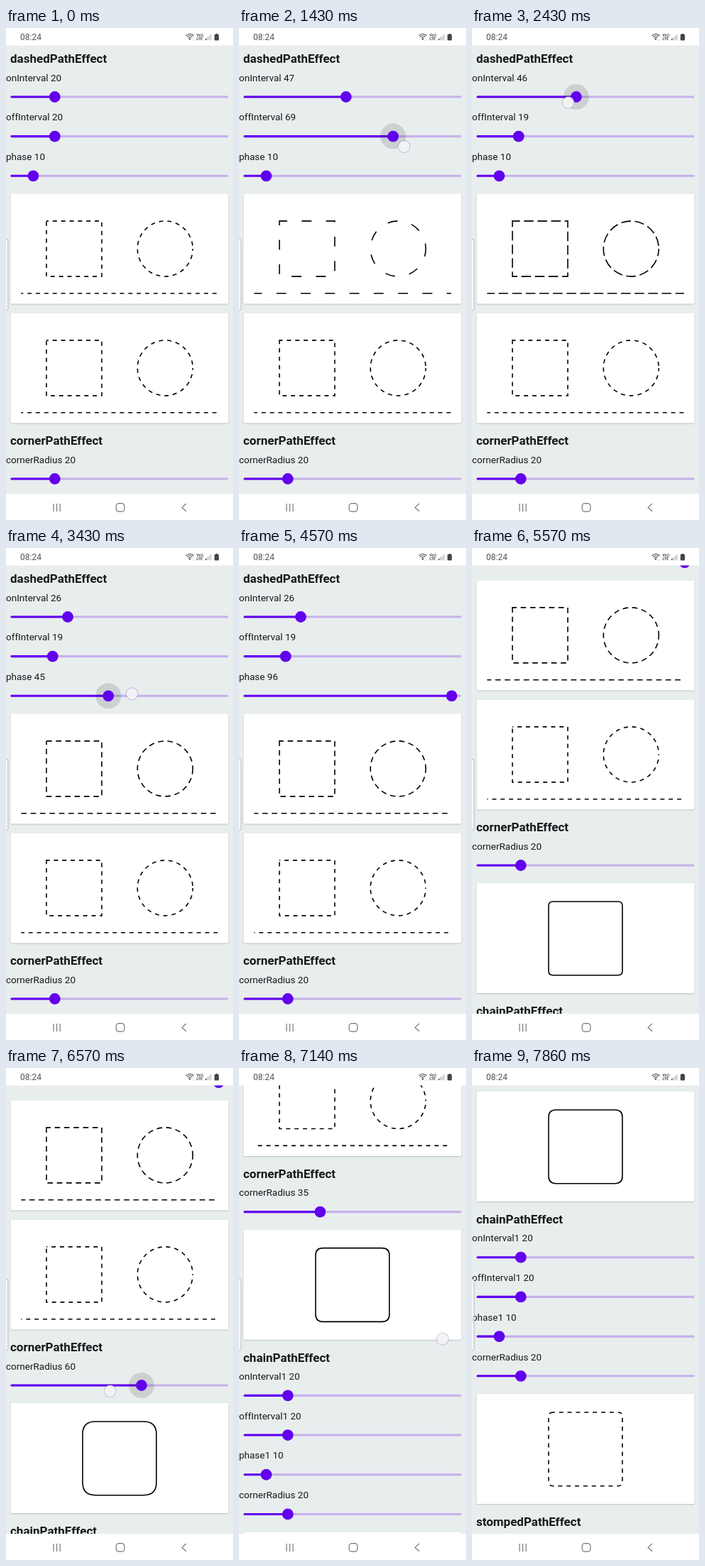
An HTML page with a canvas that plays this animation: 320 px wide and 693 px high, repeating every 8000 ms.

```html
<!DOCTYPE html>
<html lang="en">
<head>
<meta charset="utf-8">
<title>Path effects</title>
<style>
  html, body { margin: 0; width: 100%; height: 100%; overflow: hidden; background: #fff; }
  canvas { display: block; width: 320px; height: 693px; }
</style>
</head>
<body>
<canvas id="stage"></canvas>
<script>
const canvas = document.getElementById('stage');
const ctx = canvas.getContext('2d');
const ratio = window.devicePixelRatio || 1;
canvas.width = 320 * ratio;
canvas.height = 693 * ratio;

const LOOP = 8000, FPS = 7;
const UNIT = 320 / 1080; // device pixels to stage pixels
const INK = '#000', PURPLE = '#6200ee', TRACK = '#c6b1ec', PAGE = '#e8edee';
const POINTER_LEAD = 80;

// Keys are [time, value] pairs, joined by straight lines.
const motion = {
  on: [[280, 20], [860, 47], [2400, 47], [2860, 26]],
  off: [[1140, 20], [1290, 52], [1430, 69], [1510, 74], [1640, 80], [1760, 78], [2200, 19]],
  phase: [[3150, 10], [3430, 45], [3510, 56], [3850, 96]],
  corner: [[5860, 20], [6240, 97], [6380, 95], [6710, 35]],
  scroll: [[4640, 0], [4860, 85], [5000, 135], [5140, 163], [5290, 179], [5430, 186], [5570, 188],
           [6860, 188], [7000, 305], [7143, 432.5], [7290, 525], [7430, 580], [7570, 610], [7710, 623], [7857, 627]],
};
const drags = [
  { name: 'on', from: 270, to: 930, dy: 8 },
  { name: 'off', from: 1130, to: 2270, dy: 14.5 },
  { name: 'on', from: 2400, to: 2900, dy: 8 },
  { name: 'phase', from: 3140, to: 4050, dy: -3 },
  { name: 'corner', from: 5840, to: 6760, dy: 8 },
];
const swipes = [
  { from: 4640, to: 5010, x: 280, y: 520, start: 0 },
  { from: 6860, to: 7200, x: 287, y: 626, start: 188 },
];

function valueAt(keys, t) {
  if (t <= keys[0][0]) return keys[0][1];
  for (let i = 1; i < keys.length; i++) {
    const [t0, v0] = keys[i - 1], [t1, v1] = keys[i];
    if (t < t1) return v0 + (v1 - v0) * (t - t0) / (t1 - t0);
  }
  return keys[keys.length - 1][1];
}

const thumbX = value => 8 + 3.04 * value;

function text(string, x, y, size, color = '#17191a', weight = 400) {
  ctx.font = `${weight} ${size}px Roboto, sans-serif`;
  ctx.fillStyle = color;
  ctx.fillText(string, x, y);
}

function disc(x, y, r, color) {
  ctx.fillStyle = color;
  ctx.beginPath();
  ctx.arc(x, y, r, 0, 2 * Math.PI);
  ctx.fill();
}

function segment(x0, x1, y, width, color) {
  ctx.strokeStyle = color;
  ctx.lineWidth = width;
  ctx.beginPath();
  ctx.moveTo(x0, y);
  ctx.lineTo(x1, y);
  ctx.stroke();
}

const title = (string, y) => text(string, 6, y + 6, 17, '#17191a', 700);

function slider(label, value, y, active) {
  const x = thumbX(value);
  text(`${label} ${Math.round(value)}`, 0, y - 22.3, 13.5);
  ctx.lineCap = 'round';
  segment(8, 312, y, 3.1, TRACK);
  segment(8, x, y, 3.1, PURPLE);
  ctx.lineCap = 'butt';
  if (active) disc(x, y, 18, 'rgba(0,0,0,.12)');
  disc(x, y, 7.9, PURPLE);
}

function card(y) {
  ctx.save();
  ctx.shadowColor = 'rgba(0,0,0,.22)';
  ctx.shadowBlur = 2 * ratio;
  ctx.shadowOffsetY = 0.8 * ratio;
  ctx.fillStyle = '#fff';
  ctx.beginPath();
  ctx.roundRect(6.5, y, 307, 155, 1.5);
  ctx.fill();
  ctx.restore();
}

function setDash(on, off, phase) {
  ctx.setLineDash([on * UNIT, off * UNIT]);
  ctx.lineDashOffset = phase * UNIT;
}

function dashedCard(y, on, off, phase) {
  card(y);
  setDash(on, off, phase);
  ctx.strokeStyle = INK;
  ctx.lineWidth = 1.6;
  ctx.strokeRect(57, y + 38.5, 78, 78);
  ctx.beginPath();
  ctx.arc(224.3, y + 77.5, 39, 0, 2 * Math.PI);
  ctx.stroke();
  segment(21.3, 299, y + 140.3, 1.6, INK);
  ctx.setLineDash([]);
}

function cornerCard(y, radius, dash) {
  card(y);
  const r = radius * UNIT, x0 = 108, x1 = 212, y0 = y + 26, y1 = y + 129.7;
  if (dash) setDash(...dash);
  ctx.strokeStyle = INK;
  ctx.lineWidth = 1.6;
  ctx.beginPath();
  ctx.moveTo(x0 + r, y0);
  ctx.lineTo(x1 - r, y0);
  ctx.quadraticCurveTo(x1, y0, x1, y0 + r);
  ctx.lineTo(x1, y1 - r);
  ctx.quadraticCurveTo(x1, y1, x1 - r, y1);
  ctx.lineTo(x0 + r, y1);
  ctx.quadraticCurveTo(x0, y1, x0, y1 - r);
  ctx.lineTo(x0, y0 + r);
  ctx.quadraticCurveTo(x0, y0, x0 + r, y0);
  ctx.stroke();
  ctx.setLineDash([]);
}

function pointer(x, y) {
  disc(x, y, 9, 'rgba(150,145,190,.45)');
  disc(x, y, 7.9, 'rgba(248,248,250,.9)');
}

function statusBar() {
  ctx.fillStyle = '#fff';
  ctx.fillRect(0, 0, 320, 24.5);
  text('08:24', 20, 17.2, 12, '#555');
  ctx.strokeStyle = '#444';
  ctx.lineWidth = 1.2;
  for (const r of [2.5, 5, 7.5]) {
    ctx.beginPath();
    ctx.arc(259, 16, r, -Math.PI * 0.76, -Math.PI * 0.24);
    ctx.stroke();
  }
  disc(259, 15.8, 1.1, '#444');
  text('↓↑', 261, 17.5, 4, '#444', 700);
  text('Vo))', 268.5, 12, 5.2, '#444', 700);
  text('LTE', 268.5, 17.3, 5.2, '#444', 700);
  for (let i = 0; i < 4; i++) {
    ctx.fillStyle = i < 1 ? '#555' : '#c4c4c4';
    ctx.fillRect(281 + i * 2.3, 15 - i * 2, 1.6, 2.2 + i * 2);
  }
  ctx.fillStyle = '#444';
  ctx.beginPath();
  ctx.roundRect(293.8, 9, 6.2, 8.6, 1);
  ctx.fill();
  ctx.fillRect(295.6, 8, 2.6, 1.2);
}

function navigationBar() {
  ctx.fillStyle = '#fff';
  ctx.fillRect(0, 656, 320, 37);
  ctx.strokeStyle = '#777';
  ctx.lineWidth = 1.2;
  ctx.beginPath();
  for (const x of [67, 71.6, 76.2]) {
    ctx.moveTo(x, 670);
    ctx.lineTo(x, 681);
  }
  ctx.roundRect(155.3, 669.7, 11.6, 11.4, 3.6);
  ctx.moveTo(254, 670);
  ctx.lineTo(248.2, 675.4);
  ctx.lineTo(254, 680.8);
  ctx.stroke();
}

function edgeHandle() {
  ctx.fillStyle = 'rgba(246,248,248,.85)';
  ctx.strokeStyle = '#a9adaf';
  ctx.lineWidth = 0.8;
  ctx.beginPath();
  ctx.roundRect(-6, 297, 9, 101, 3);
  ctx.fill();
  ctx.stroke();
}

function draw(t) {
  const at = (name, time = t) => valueAt(motion[name], time);
  const during = span => t >= span.from && t < span.to;
  const drag = drags.find(during);
  const swipe = swipes.find(during);
  const scroll = at('scroll');
  const rows = { on: 97, off: 152.6, phase: 208.3, corner: 635 };
  const dragSlider = (name, label) =>
    slider(label, at(name), rows[name], drag && drag.name === name);

  ctx.setTransform(ratio, 0, 0, ratio, 0, 0);
  ctx.fillStyle = PAGE;
  ctx.fillRect(0, 0, 320, 693);

  ctx.save();
  ctx.translate(0, -scroll);
  title('dashedPathEffect', 43);
  dragSlider('on', 'onInterval');
  dragSlider('off', 'offInterval');
  dragSlider('phase', 'phase');
  dashedCard(233.4, at('on'), at('off'), at('phase'));
  dashedCard(401.4, 20, 20, 10.4 + 40 * (t % 500) / 500);

  title('cornerPathEffect', 581.3);
  dragSlider('corner', 'cornerRadius');
  cornerCard(660, at('corner'));

  title('chainPathEffect', 840);
  slider('onInterval1', 20, 893.7);
  slider('offInterval1', 20, 949.4);
  slider('phase1', 10, 1005.1);
  slider('cornerRadius', 20, 1060.8);
  cornerCard(1086, 20, [20, 20, 10]);

  title('stompedPathEffect', 1266);
  ctx.restore();

  if (drag) pointer(thumbX(at(drag.name, t + POINTER_LEAD)), rows[drag.name] + drag.dy - scroll);
  if (swipe) pointer(swipe.x, swipe.y - (scroll - swipe.start));
  edgeHandle();
  statusBar();
  navigationBar();
}

function tick() {
  const t = performance.now() % LOOP;
  draw(Math.floor((t + 3) * FPS / 1000) % (LOOP * FPS / 1000) * 1000 / FPS);
  requestAnimationFrame(tick);
}
tick();
</script>
</body>
</html>
```
